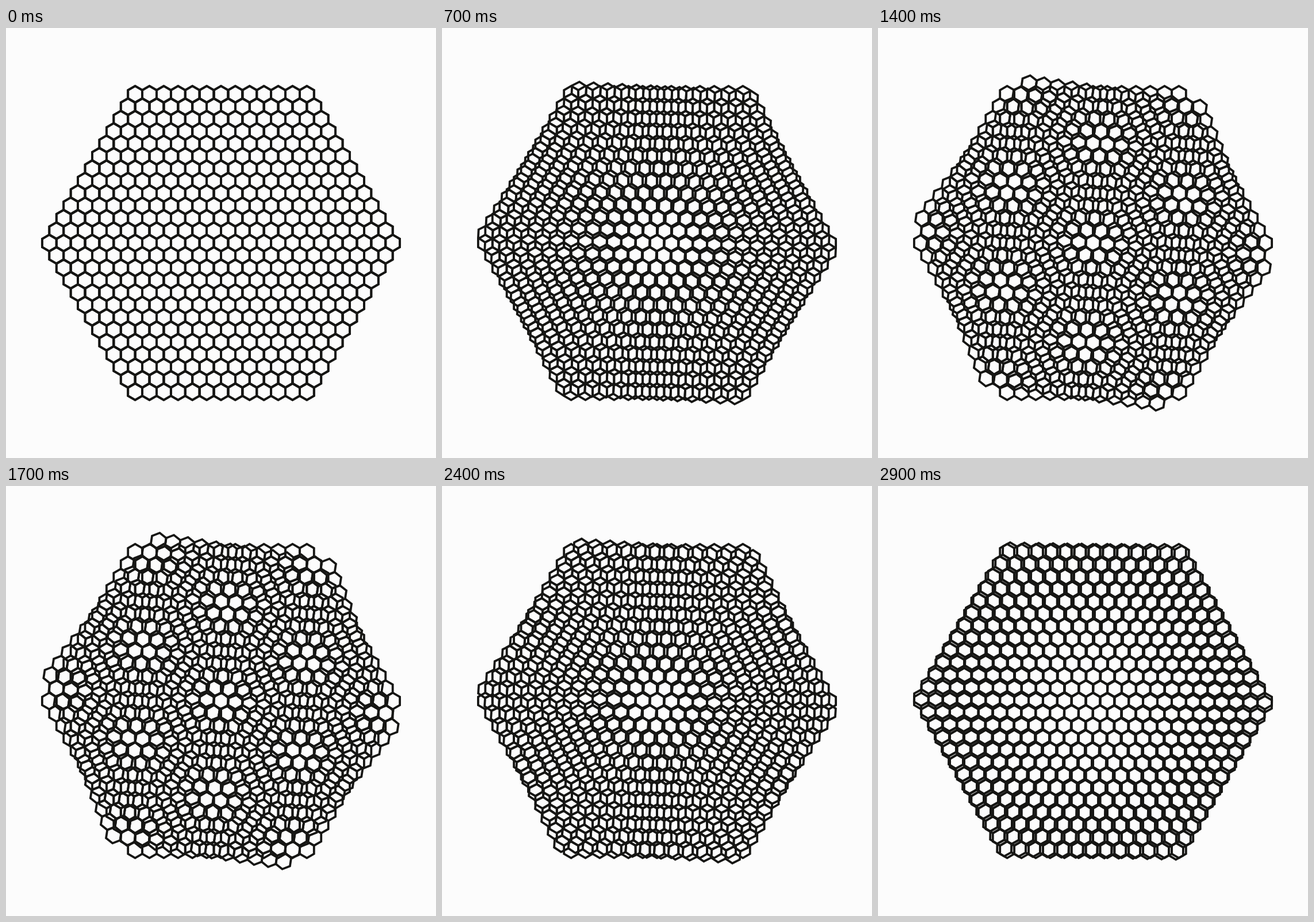
Animation of 748 by 748 pixels, one loop 3 s. Source, as an HTML page with a canvas:

```html
<!DOCTYPE html>
<html lang="en">
<head>
<meta charset="utf-8">
<title>Hexagon moiré</title>
<style>
  html, body { margin: 0; width: 100%; height: 100%; overflow: hidden; background: #fcfcfc; }
  canvas { display: block; }
</style>
</head>
<body>
<canvas id="stage" width="748" height="748"></canvas>
<script>
const ctx = document.getElementById('stage').getContext('2d');
const SIZE = 748;
const LOOP = 3000;
const STEP = 100;
const RINGS = 12;
const PITCH = 24.89;
const RADIUS = PITCH / Math.sqrt(3);
const MAX_ANGLE = 9;
const REST_ANGLE = 1;

// Clockwise degrees: accelerating rise, cosine fall, then a snap back to zero.
function swingAt(t) {
  const u = t / (LOOP / 2);
  if (u < 1) return MAX_ANGLE * u ** 1.45;
  const fall = (1 + Math.cos(Math.PI * (u - 1))) / 2;
  return REST_ANGLE + (MAX_ANGLE - REST_ANGLE) * fall;
}

function hexagon(x, y) {
  const path = new Path2D();
  for (let k = 0; k < 6; k++) {
    const angle = (k + 0.5) * Math.PI / 3;
    path.lineTo(x + RADIUS * Math.cos(angle), y + RADIUS * Math.sin(angle));
  }
  path.closePath();
  return path;
}

function buildGrid() {
  const cells = [];
  for (let row = -RINGS; row <= RINGS; row++) {
    const count = 2 * RINGS + 1 - Math.abs(row);
    for (let col = 0; col < count; col++) {
      cells.push(hexagon((col - (count - 1) / 2) * PITCH, row * RADIUS * 1.5));
    }
  }
  return cells;
}

const grid = buildGrid();

function drawGrid(degrees) {
  ctx.save();
  ctx.translate(SIZE / 2, SIZE / 2);
  ctx.rotate(degrees * Math.PI / 180);
  for (const cell of grid) ctx.stroke(cell);
  ctx.restore();
}

function render(now) {
  const t = Math.floor((now % LOOP) / STEP) * STEP;
  ctx.fillStyle = '#fcfcfc';
  ctx.fillRect(0, 0, SIZE, SIZE);
  ctx.strokeStyle = '#161614';
  ctx.lineWidth = 3.8;
  drawGrid(0);
  drawGrid(swingAt(t));
}

let start;
function tick(now) {
  start ??= now;
  render(Math.max(0, now - start));
  requestAnimationFrame(tick);
}
render(0);
requestAnimationFrame(tick);
</script>
</body>
</html>
```
